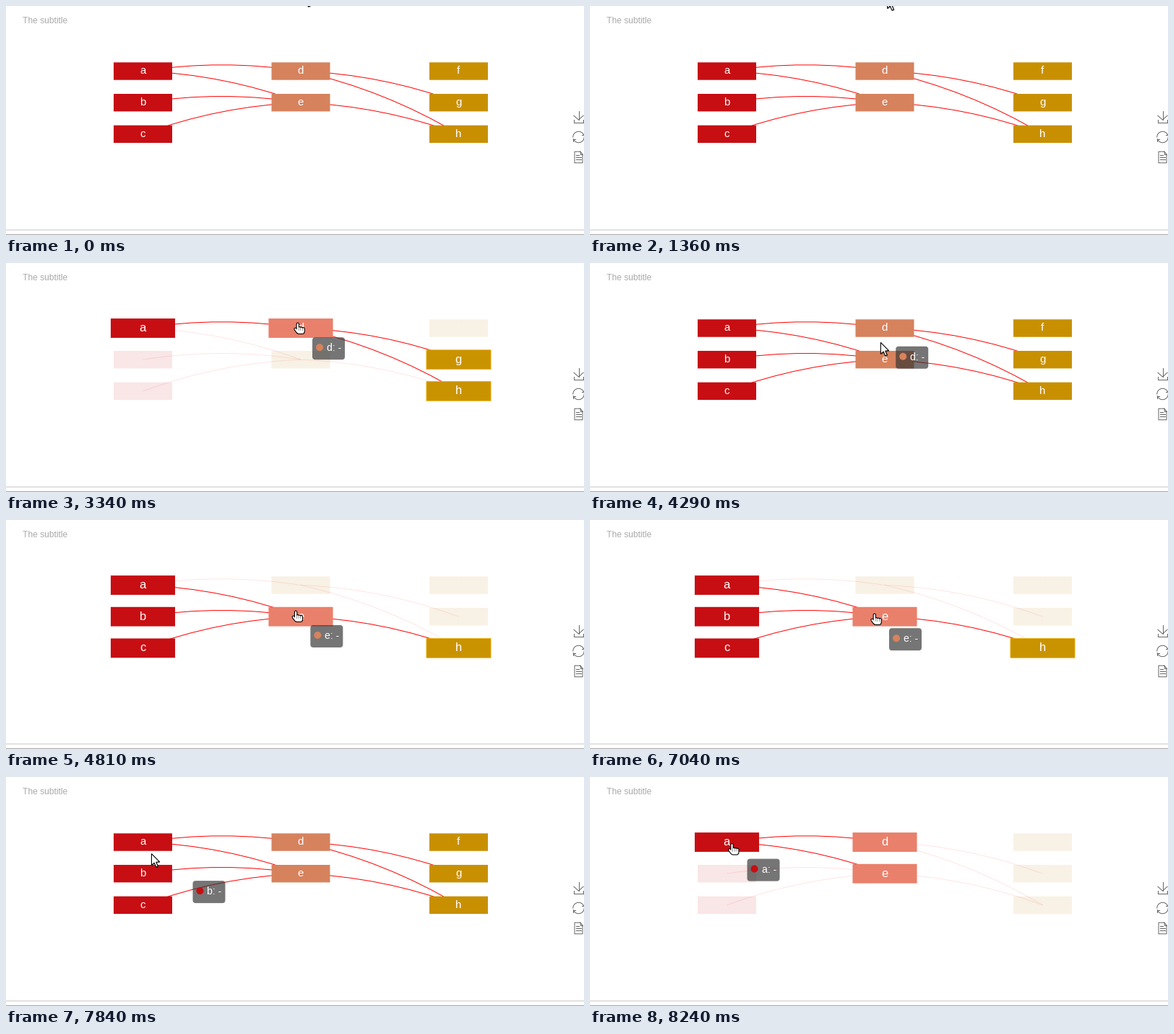
Write a matplotlib script that moves like this. It is 800 by 318 pixels and loops after 9.6 s.

```python
import numpy as np
import matplotlib.pyplot as plt
from matplotlib.animation import FuncAnimation
from matplotlib.patches import Circle, FancyBboxPatch, PathPatch, Polygon, Rectangle
from matplotlib.path import Path

W, H, DPI = 800, 318, 100
STEP, LOOP = 40, 9600
FRAMES = LOOP // STEP
PX = 72 / DPI  # points per pixel

RED, CORAL, GOLD = "#c70e13", "#d6825d", "#c89000"
HOT = {RED: RED, CORAL: "#e9806b", GOLD: "#c99300"}
GOLD_RIM, FADED_WARM = "#f0ae08", "#c07d00"
FADE, GROW, CURVE = 0.1, 1.1, 0.08
NODE = np.array([81, 24.4])
TIP_SIZE, TIP_OFFSET, TIP_GLIDE = (45, 31), (20, 19.2), 0.365

# Nodes sit on a regular grid, one column per colour.
POS, COLOR = {}, {}
for col, (names, color) in enumerate([("abc", RED), ("de", CORAL), ("fgh", GOLD)]):
    for row, name in enumerate(names):
        POS[name] = np.array([189.5 + 218.5 * col, 90.5 + 43.7 * row])
        COLOR[name] = color
EDGES = ["ad", "ae", "be", "ce", "dg", "dh", "eh"]

# Pointer strokes: leave, arrive, and where relative to which node.
ENTRY = POS["d"] + (4, -108)
STROKES = [(1320, 2080, "d", (-4, -12.5)), (2080, 2280, "d", (-4, -6.5)),
           (4010, 4450, "e", (-6.7, -7.2)), (5080, 5260, "e", (-14, -3.2)),
           (7040, 7480, "b", (19, -8)), (7480, 8080, "a", (7.2, 3))]


def pointer_at(t):
    spot = ENTRY
    for leave, arrive, name, offset in STROKES:
        k = np.clip((t - leave) / (arrive - leave), 0, 1)
        spot = spot + k * (POS[name] + offset - spot)
    return spot


def elastic(k):
    return 1 if k >= 1 else 1 + 2 ** (-10 * k) * np.sin((k - 0.1) * 5 * np.pi)


def focus_of(hover):
    """The hovered node and its neighbours."""
    return {n for e in EDGES if hover in e for n in e} if hover else set()


def node_under(spot, focus):
    for name, center in POS.items():
        reach = NODE / 2 * (GROW if name in focus else 1)
        if np.all(np.abs(spot - center) <= reach):
            return name
    return None


def simulate():
    """State of every frame: pointer, hover, focus, node scales, tooltip."""
    tweens = {name: (1, 1, 0) for name in POS}
    focus, tip, label = set(), None, None

    def scale(name, t):
        begin, goal, since = tweens[name]
        return begin + (goal - begin) * elastic((t - since) / 400)

    for t in range(0, LOOP, STEP):
        spot = pointer_at(t)
        hover = node_under(spot, focus)
        focus = focus_of(hover)
        for name in POS:
            goal = GROW if name in focus else 1
            if goal != tweens[name][1]:
                tweens[name] = (scale(name, t), goal, t)
        if hover:
            goal = spot + TIP_OFFSET
            tip = goal if tip is None else tip + TIP_GLIDE * (goal - tip)
            label = hover
        yield spot, hover, focus, {n: scale(n, t) for n in POS}, tip, label


STORY = list(simulate())

fig = plt.figure(figsize=(W / DPI, H / DPI), dpi=DPI, facecolor="white")
ax = fig.add_axes([0, 0, 1, 1])
ax.set_xlim(0, W)
ax.set_ylim(H, 0)
ax.axis("off")


def write(x, y, text, size, color, **kw):
    return ax.text(x, y, text, fontsize=size * PX, color=color,
                   family="Liberation Sans", va="baseline", **kw)


def icon(cy, lines):
    for line in lines:
        xs, ys = np.transpose(line)
        ax.plot(xs + 792.5, ys + cy, color="#666666", lw=PX)


def download_icon(cy):
    icon(cy, [[(0, -8), (0, 4.3)],
              [(-6.6, -1.6), (0, 4.3), (6.6, -1.6)],
              [(-6.7, 4), (-6.7, 7.8), (6.7, 7.8), (6.7, 4)]])


def refresh_icon(cy):
    angle = np.radians(np.linspace(-20, -180, 30))
    arc = 7.7 * np.column_stack([np.cos(angle), np.sin(angle)])
    hook = np.array([(4.7, -3.1), (7.5, -3.1), (7.5, -5.9)])
    icon(cy, [side * part for side in (1, -1) for part in (arc, hook)])


def page_icon(cy):
    w, h, fold = 5.5, 7.8, 3.5
    corner, notch = (w - fold, -h), (w, fold - h)
    icon(cy, [[corner, (-w, -h), (-w, h), (w, h), notch, corner],
              [corner, (w - fold, fold - h), notch]])
    icon(cy, [[(-3.8, y), (3.8, y)] for y in (0, 3.4)] + [[(-3.8, -3.4), (0.5, -3.4)]])


def make_edge(edge):
    start, end = POS[edge[0]], POS[edge[1]]
    dx, dy = end - start
    bend = (start + end) / 2 + CURVE * np.array([dy, -dx])
    path = Path([start, bend, end], [Path.MOVETO, Path.CURVE3, Path.CURVE3])
    return ax.add_patch(PathPatch(path, fc="none", ec="#ff0000", lw=PX, zorder=1))


def make_node(name):
    box = ax.add_patch(Rectangle((0, 0), 1, 1, zorder=2, snap=False))
    x, y = POS[name]
    return box, write(x - 0.4, y, name, 15, "white", ha="center", zorder=3)


def hand_strokes():
    """Fingers, thumb and palm as thick round strokes, joined by gaps."""
    fingers = [[(5.5 + 2.6 * j, 2.2 if j == 0 else 7.2 + 0.5 * j), (5.5 + 2.6 * j, 13)]
               for j in range(4)]
    thumb = [(2.2, 9.3), (5.5, 13.5)]
    palm = [[(6.6, y), (12.6, y)] for y in (13, 14.3)]
    gap = [(np.nan, np.nan)]
    points = [p for line in [*fingers, thumb, *palm] for p in line + gap]
    return np.array(points) - (5.7, 1.5)


write(23, 24, "The subtitle", 12, "#aaaaaa")
for y, h, color in [(310, 2, "#e3e1e1"), (317, 1, "#a8a4a4")]:
    ax.add_patch(Rectangle((0, y), W, h, color=color, lw=0))
download_icon(153.8)
refresh_icon(182)
page_icon(210)

edges = {e: make_edge(e) for e in EDGES}
nodes = {n: make_node(n) for n in POS}

tip_box = ax.add_patch(FancyBboxPatch(
    (0, 0), *TIP_SIZE, boxstyle="round,pad=0,rounding_size=4",
    fc=(0.196, 0.196, 0.196, 0.67), lw=0, zorder=5))
tip_dot = ax.add_patch(Circle((0, 0), 5, lw=0, zorder=6))
tip_text = write(0, 0, "", 14, "white", zorder=6)

ARROW = np.array([(0, 0), (0, 16), (3.8, 12.6), (6.4, 18.6), (8.9, 17.4),
                  (6.4, 11.7), (11.2, 11.3)])
HAND = hand_strokes()
shadow = ax.add_patch(Polygon(ARROW, fc="black", lw=0, alpha=0.3, zorder=8))
arrow = ax.add_patch(Polygon(ARROW, fc="white", ec="black", lw=1.1 * PX, zorder=9))
hand = [ax.plot([], [], color=color, lw=width * PX, zorder=9,
                solid_capstyle="round")[0]
        for color, width in [("black", 4.4), ("white", 2.2)]]


def paint_node(name, scale, focus):
    box, label = nodes[name]
    size = NODE * scale
    box.set_bounds(*(POS[name] - size / 2), *size)
    color, rim, alpha = COLOR[name], 0, 1
    if name in focus:
        rim = 0.8 * PX if color == GOLD else 0
        color = HOT[color]
    elif focus:
        color, alpha = (RED if color == RED else FADED_WARM), FADE
    box.set(facecolor=color, edgecolor=GOLD_RIM, linewidth=rim, alpha=alpha)
    label.set(y=POS[name][1] + 4 * scale, fontsize=15 * PX * scale, alpha=alpha)


def paint_tip(place, label):
    for part in (tip_box, tip_dot, tip_text):
        part.set_visible(label is not None)
    if label:
        x, y = place
        tip_box.set_bounds(x, y, *TIP_SIZE)
        tip_dot.set(center=(x + 10, y + 14), facecolor=COLOR[label])
        tip_text.set(x=x + 20, y=y + 19, text=f"{label}: -")


def paint_cursor(spot, hover):
    for part, shift in [(arrow, 0), (shadow, 1.2)]:
        part.set_xy(ARROW + spot + shift)
        part.set_visible(not hover)
    for line in hand:
        line.set_data(*(HAND + spot).T)
        line.set_visible(bool(hover))


def update(i):
    spot, hover, focus, scales, tip, label = STORY[i]
    for name in nodes:
        paint_node(name, scales[name], focus)
    for edge, line in edges.items():
        line.set_alpha(1 if not hover or hover in edge else FADE)
    paint_tip(tip, label)
    paint_cursor(spot, hover)
    return []


# The pointer waits above the stage until its first stroke.
ENTRY = ENTRY - (0, 2)
anim = FuncAnimation(fig, update, frames=FRAMES, interval=STEP,
                     repeat=True, repeat_delay=0, blit=False)
plt.show()
```
